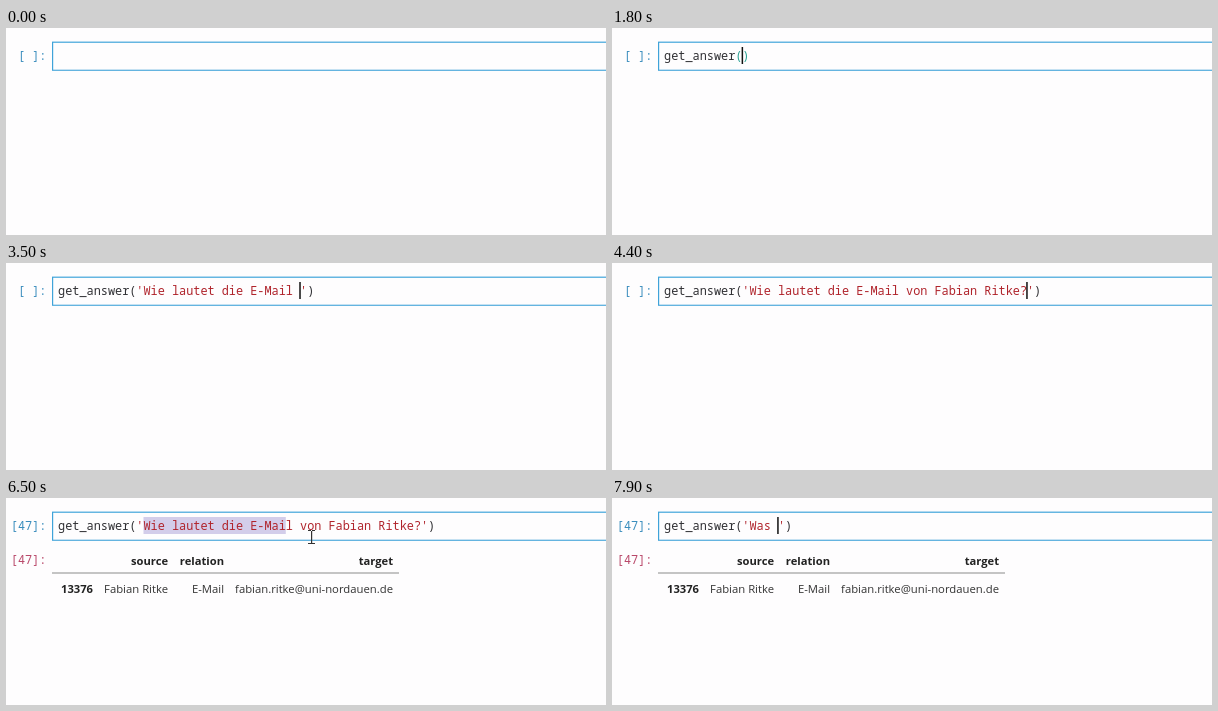
Write an HTML page with a canvas that moves like this. It is 600x207 px and loops after 8 s.

```html
<!DOCTYPE html>
<html lang="de">
<head>
<meta charset="utf-8">
<title>Notebook</title>
<style>
html, body { margin: 0; width: 100%; height: 100%; overflow: hidden; background: #fefdfe; }
canvas { display: block; width: 600px; height: 207px; }
</style>
</head>
<body>
<canvas id="stage"></canvas>
<script>
const LOOP = 8000;
const X0 = 52.1, STEP = 7.115;
const MONO = '11.86px "Noto Sans Mono", "DejaVu Sans Mono", monospace';
const SANS = '11.3px "Open Sans", "Noto Sans", sans-serif';
const BOLD = 'bold 11.2px "Open Sans", "Noto Sans", sans-serif';
const COLOR = {
  page: '#fefdfe', ink: '#303034', string: '#b0242c', match: '#2aa294',
  blue: '#3a8dbd', edge: '#3fa3d9', red: '#b9496a', idle: '#b9b9bb', select: '#d3cdea'
};

const CALL = 'get_answer';
const PERSON = 'Fabian Ritke';
const MAIL = 'fabian.ritke@uni-nordauen.de';
const QUESTION = `Wie lautet die E-Mail von ${PERSON}?`;

// Typing bursts: start time and letters present after each 100 ms step.
const CALL_KEYS = [[1200, [1, 3, 5, 6, 8, 10, 11]]];
const QUESTION_KEYS = [
  [2100, [0, 2, 4, 6, 8, 10, 11, 13, 15]],
  [3100, [16, 17, 18, 20, 22, 24, 26, 28, 30]],
  [4000, [32, 34, 36, 38, 39]]
];
const RUN = 5400, CLICK = 6100, CLEAR = 7600;

const DRAG = [[CLICK, 12], [6200, 15], [6300, 20], [6400, 26], [6500, 32],
  [6600, 38], [6700, 44], [6800, 49], [6900, 51]];
const MOUSE = [[5900, 112, 88], [6000, 124, 55], [6100, 138, 30], [6200, 168, 31],
  [6300, 210, 34], [6400, 258, 37], [6500, 305, 39], [6600, 337, 39],
  [6700, 367, 37], [6800, 399, 37], [6900, 426, 33], [7100, 286, 88]];

const canvas = document.getElementById('stage');
const ctx = canvas.getContext('2d');
const ratio = window.devicePixelRatio || 1;
canvas.width = 600 * ratio;
canvas.height = 207 * ratio;
ctx.scale(ratio, ratio);

const colX = col => X0 + col * STEP;
const latest = (list, t) => list.filter(item => item[0] <= t).pop();

function typed(bursts, t) {
  const burst = latest(bursts, t);
  if (!burst) return 0;
  const [start, counts] = burst;
  return counts[Math.min(counts.length - 1, Math.floor((t - start) / 100))];
}

function rect(x, y, w, h, color) {
  ctx.fillStyle = color;
  ctx.fillRect(x, y, w, h);
}

function text(str, x, y, font, color, align = 'left') {
  ctx.font = font;
  ctx.fillStyle = color;
  ctx.textAlign = align;
  ctx.fillText(str, x, y);
}

const code = (str, col, color) => text(str, colX(col), 32, MONO, color);
const prompt = (str, y, color) => text(str, 40.4, y, MONO, color, 'right');

function caretOn(t) {
  if (t < 1200) return (t >= 200 && t < 500) || (t >= 700 && t < 1000);
  if (t < RUN) return t < 4600 || (t >= 4900 && t < 5200);
  return (t >= CLICK && t < 6200) || t >= CLEAR;
}

function editor(t) {
  if (t < 2100) {
    const n = typed(CALL_KEYS, t);
    const open = n > CALL.length;
    return { name: CALL.slice(0, n), open, str: null, caret: n };
  }
  let str = QUESTION.slice(0, typed(QUESTION_KEYS, t));
  if (t >= CLEAR) str = 'Was '.slice(0, t < 7800 ? 0 : t < 7900 ? 2 : 4);
  const caret = t >= CLICK && t < CLEAR ? 12 : 12 + str.length;
  return { name: CALL, open: true, str, caret };
}

function drawCell(t, active) {
  if (active) {
    rect(46, 13.6, 560, 29.2, COLOR.edge);
    rect(47.2, 14.8, 560, 26.9, COLOR.page);
  } else {
    rect(46, 13.6, 560, 28.4, '#dfdfe1');
    rect(47, 14.6, 560, 26.4, '#f5f4f5');
  }

  if (t >= CLICK && t < CLEAR) {
    const end = latest(DRAG, t)[1];
    rect(colX(12), 19, (end - 12) * STEP, 17, COLOR.select);
  }

  const { name, open, str, caret } = editor(t);
  code(name, 0, COLOR.ink);
  if (open) {
    const quoted = str === null ? '' : `'${str}'`;
    const paren = quoted ? COLOR.ink : COLOR.match;
    code('(', 10, paren);
    code(quoted, 11, COLOR.string);
    code(')', 11 + quoted.length, paren);
  }
  if (caretOn(t)) rect(colX(caret) - 0.75, 19, 1.5, 17, '#111');
}

function drawTable() {
  const head = [['source', 162], ['relation', 218], ['target', 387]];
  const row = [[PERSON, 162], ['E-Mail', 218], [MAIL, 387]];
  head.forEach(([s, x]) => text(s, x, 67, BOLD, '#222', 'right'));
  rect(46, 74.5, 347, 1, '#8c8c8c');
  text('13376', 87, 94.5, BOLD, '#222', 'right');
  row.forEach(([s, x]) => text(s, x, 94.5, SANS, '#333', 'right'));
}

function drawMouse(t) {
  if (t < 5900 || t >= 7200) return;
  const [, x, y] = latest(MOUSE, t);
  rect(x, y - 6, 1.2, 13, '#333');
  for (const edge of [y - 7, y + 6]) {
    rect(x - 3, edge, 3, 1, '#333');
    rect(x + 1, edge, 3, 1, '#333');
  }
}

function draw(t) {
  rect(0, 0, 600, 207, COLOR.page);
  const done = t >= RUN;
  const active = !done || t >= CLICK;
  drawCell(t, active);
  prompt(done ? '[47]:' : '[ ]:', 32, active ? COLOR.blue : COLOR.idle);
  if (done) {
    prompt('[47]:', 66, active ? COLOR.red : COLOR.idle);
    drawTable();
  }
  drawMouse(t);
}

const began = performance.now();
function tick() {
  draw((performance.now() - began) % LOOP);
  requestAnimationFrame(tick);
}
tick();
</script>
</body>
</html>
```
